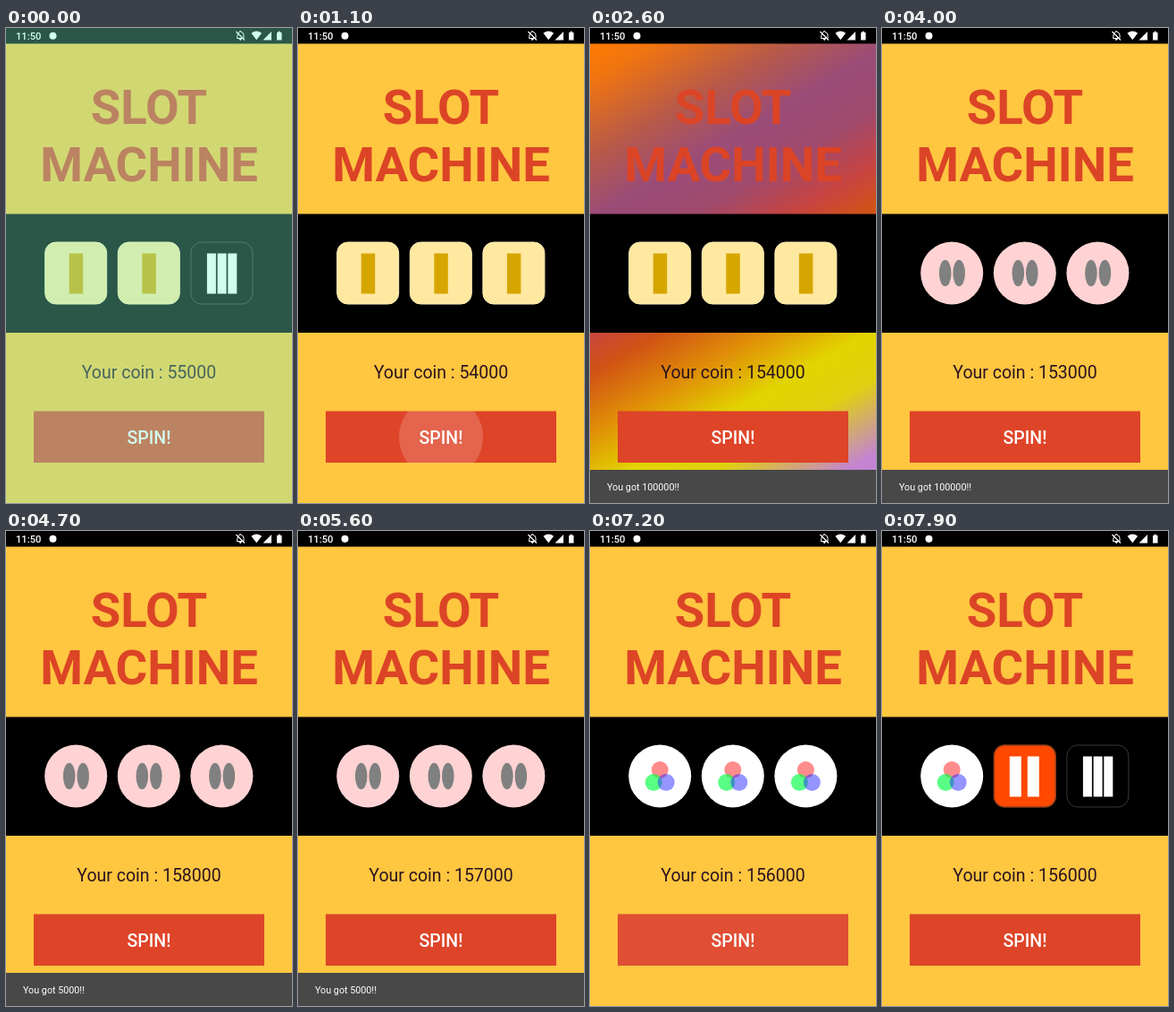
An HTML page that plays this animation: 320x530 px, repeating every 8 s.

```html
<!DOCTYPE html>
<html lang="en">
<head>
<meta charset="utf-8">
<title>Slot machine</title>
<style>
  html, body { margin: 0; width: 100%; height: 100%; overflow: hidden; background: #ffc640; }
  svg { display: block; width: 100%; height: 100%; }
  text { font-family: Roboto, sans-serif; }
  .middle { text-anchor: middle; }
  .title { font-size: 54.5px; font-weight: 700; fill: #dc4426; }
  .label { font-size: 19.5px; }
</style>
</head>
<body>
<svg viewBox="0 0 320 530">
  <defs>
    <linearGradient id="party" gradientUnits="userSpaceOnUse" x1="9" y1="13" x2="311" y2="535">
      <stop offset="0" stop-color="#ff7a00"/>
      <stop offset=".06" stop-color="#f07410"/>
      <stop offset=".18" stop-color="#b85a48"/>
      <stop offset=".28" stop-color="#9a4c78"/>
      <stop offset=".37" stop-color="#a04a6c"/>
      <stop offset=".46" stop-color="#c84440"/>
      <stop offset=".53" stop-color="#d05414"/>
      <stop offset=".62" stop-color="#e08c08"/>
      <stop offset=".72" stop-color="#e2d400"/>
      <stop offset=".8" stop-color="#e0d010"/>
      <stop offset=".92" stop-color="#c484d0"/>
      <stop offset="1" stop-color="#c480d8"/>
    </linearGradient>
    <clipPath id="buttonArea"><rect x="31" y="427.5" width="258" height="57.5"/></clipPath>

    <g id="single">
      <rect x=".5" y=".5" width="69" height="69" rx="12" fill="#ffe8a0" stroke="#ffedb8"/>
      <path d="M27.5 13h15.5v45h-15.5z" fill="#d6a600"/>
    </g>
    <g id="double">
      <rect x=".5" y=".5" width="69" height="69" rx="12" fill="#ff4800" stroke="#8c3c1c" stroke-width="1.4"/>
      <path d="M18 13h13v45h-13zM38 13h13v45h-13z" fill="#fff"/>
    </g>
    <g id="triple">
      <rect x=".5" y=".5" width="69" height="69" rx="12" stroke="#484848" stroke-width=".8"/>
      <path d="M18.5 13h10v45h-10zM30.2 13h10v45h-10zM41.9 13h10v45h-10z" fill="#fff"/>
    </g>
    <g id="lights">
      <circle cx="35" cy="35" r="35" fill="#fff"/>
      <circle cx="35" cy="28" r="9.5" fill="#f00" fill-opacity=".45"/>
      <circle cx="28" cy="42" r="9.5" fill="#0f4" fill-opacity=".65"/>
      <circle cx="42" cy="42" r="9.5" fill="#22f" fill-opacity=".48"/>
    </g>
    <g id="snout">
      <circle cx="35" cy="35" r="35" fill="#ffd3d3"/>
      <ellipse cx="27.5" cy="35" rx="6.8" ry="14.8" fill="#808080"/>
      <ellipse cx="43" cy="35" rx="6.8" ry="14.8" fill="#808080"/>
    </g>
  </defs>

  <rect width="320" height="530" fill="#ffc640"/>
  <rect id="celebration" width="320" height="530" fill="url(#party)"/>

  <!-- status bar -->
  <rect width="320" height="17.5"/>
  <g fill="#fff">
    <text x="11" y="12.7" font-size="11.2" font-weight="500">11:50</text>
    <circle cx="52.5" cy="8.7" r="4"/>
    <path d="M258.5 11.5h7.5v-3.5q0-3-3-3.5v-.8h-1.5v.8q-2.5.5-2.5 3.5zM261 12.5h2.5l-1.2 1.3z"
          fill="none" stroke="#fff"/>
    <path d="M257.5 4l9.5 9.5" stroke="#fff" stroke-width="1.2"/>
    <path d="M274.5 5.7q5.8-4.5 11.6 0l-5.8 7.5zM297 4v9.5h-9.5z"/>
    <path d="M303 5h1.5v-1.2h2.5v1.2h1.5v8.5h-5.5z"/>
  </g>

  <g class="middle title">
    <text x="160" y="106.5">SLOT</text>
    <text x="160" y="170.5">MACHINE</text>
  </g>

  <rect y="207.5" width="320" height="132.5"/>
  <use class="reel" x="43.2" y="238.5"/>
  <use class="reel" x="124.8" y="238.5"/>
  <use class="reel" x="206.4" y="238.5"/>

  <text id="coins" class="middle label" x="160" y="390.5" fill="#2b1420"></text>

  <rect x="31" y="427.5" width="258" height="57.5" fill="#de4428"/>
  <circle id="ripple" cx="160" cy="456.5" fill="#fff" clip-path="url(#buttonArea)"/>
  <text class="middle label" x="160" y="463.5" font-weight="500" fill="#fff">SPIN!</text>

  <g id="snackbar">
    <rect y="493" width="320" height="38" fill="#484848"/>
    <text id="message" x="19" y="516" font-size="10.75" fill="#fff"></text>
  </g>

  <rect id="tint" width="320" height="530" fill="#7dfacd"/>
</svg>
<script>
const LOOP = 8000, STEP = 100, SLIDE = 250, HOLD = 1750;
const symbols = ["single", "double", "triple", "lights", "snout"];
const spins = [
  { start: 1050, stop: 2300, result: ["single", "single", "single"], prize: 100000 },
  { start: 3550, stop: 4450, result: ["snout", "snout", "snout"], prize: 5000 },
  { start: 5150, stop: 6100, result: ["triple", "single", "snout"], prize: 0 },
  { start: 6900, stop: 7800, result: ["lights", "double", "triple"], prize: 0 }
];

const find = id => document.getElementById(id);
const reels = document.querySelectorAll(".reel");
const [celebration, coins, ripple, snackbar, message, tint] =
  ["celebration", "coins", "ripple", "snackbar", "message", "tint"].map(find);
const clamp = v => Math.min(1, Math.max(0, v));
const easeOut = v => 1 - (1 - clamp(v)) ** 3;

function draw(t) {
  let balance = 55000, shown = ["single", "single", "triple"];
  let glow = 0, press = 1, lift = 0;

  for (const [i, { start, stop, result, prize }] of spins.entries()) {
    if (t < start) break;
    balance -= 1000;
    press = clamp((t - start) / 400);
    if (t < stop) {
      shown = Array(3).fill(symbols[Math.floor((t - start) / STEP) % symbols.length]);
      continue;
    }
    shown = result;
    balance += prize;
    const since = t - stop;
    if (prize && since < HOLD + SLIDE) {
      lift = easeOut(since / SLIDE) - easeOut((since - HOLD) / SLIDE);
      message.textContent = `You got ${prize}!!`;
    }
    if (i === 0 && t < spins[1].start) glow = clamp(since / 150);
  }

  reels.forEach((reel, i) => reel.setAttribute("href", "#" + shown[i]));
  coins.textContent = `Your coin : ${balance}`;
  celebration.setAttribute("opacity", glow);
  ripple.setAttribute("r", 140 * easeOut(press));
  ripple.setAttribute("opacity", 0.2 * (1 - press));
  snackbar.setAttribute("transform", `translate(0 ${38 * (1 - lift)})`);
  tint.setAttribute("opacity", 0.35 * clamp(1 - Math.floor(t / 100) / 3));
}

const origin = performance.now();
function tick() {
  draw((performance.now() - origin) % LOOP);
  requestAnimationFrame(tick);
}
tick();
</script>
</body>
</html>
```
